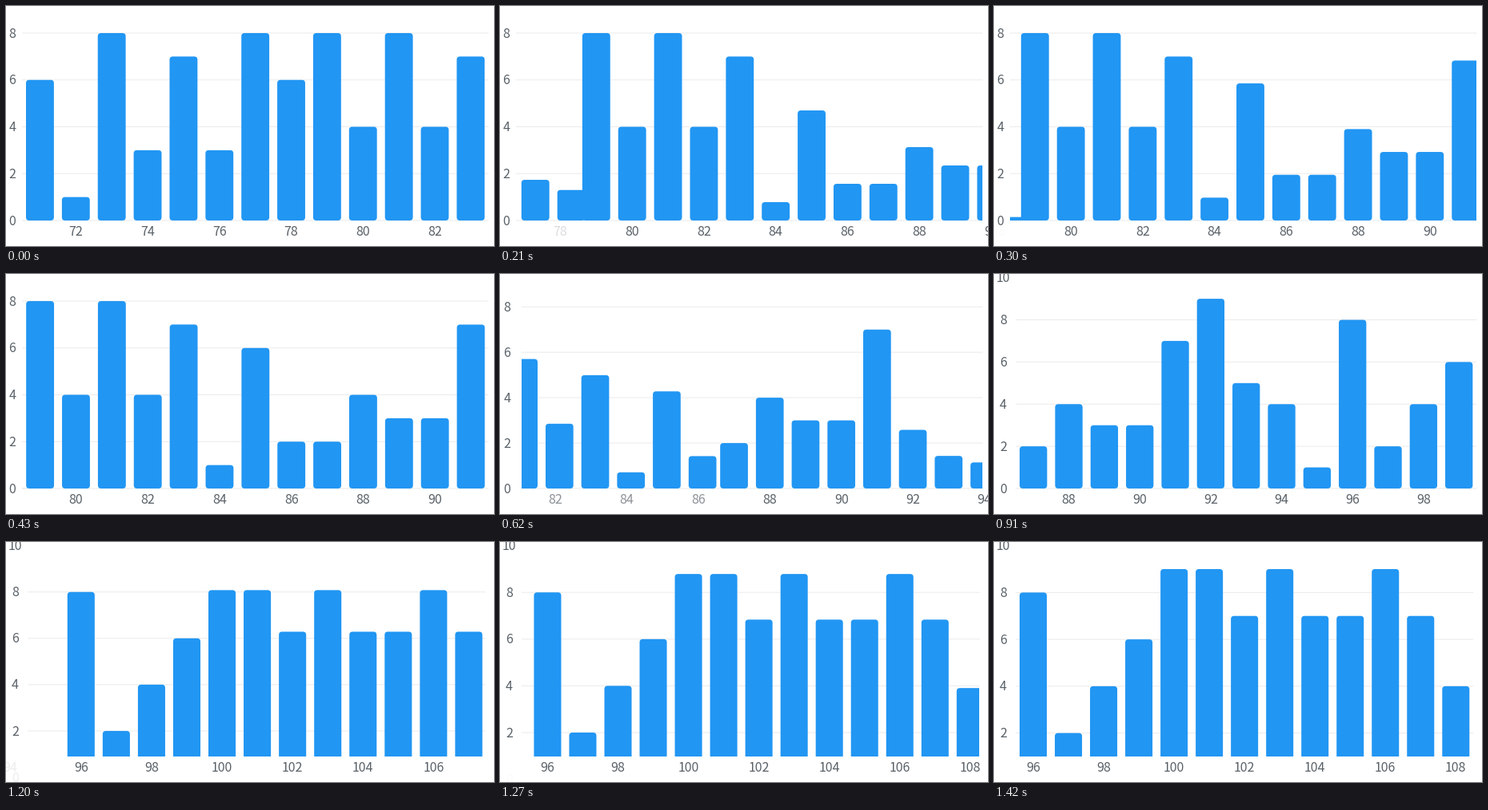
Animation, 610 px wide and 301 px high, one loop 1650 ms. Source, as a matplotlib script:

```python
import matplotlib.pyplot as plt
from matplotlib.animation import FuncAnimation
from matplotlib.patches import FancyBboxPatch, Rectangle

W, H, DPI = 610, 301, 64
PX = 72 / DPI
LOOP, TICK, REFRESH = 1650, 10, 30
EASE_MS = 291
BLUE, GRID, INK = "#2196f3", "#ebebeb", "#596168"
TOP, BOTTOM, CLIP_TOP = 4.6, 269, 20
BARS, GAP, FIRST = 13, 10, 71

# bar heights from FIRST onwards
VALUES = [6, 1, 8, 3, 7, 3, 8, 6, 8, 4, 8, 4, 7, 1, 6, 2, 2, 4, 3,
          3, 7, 9, 5, 4, 1, 8, 2, 4, 6, 9, 9, 7, 9, 7, 7, 9, 7, 4]


def digits(n):
    return len(str(n))


class View:
    """A settled window of bars; its scales follow from the data it holds."""

    def __init__(self, first):
        self.first = first
        self.keys = range(first, first + BARS)
        data = [VALUES[k - FIRST] for k in self.keys]
        self.low, high = min(data) - 1, max(data) + 1
        self.marks = [m for m in range(self.low, high + 1) if m % 2 == 0]
        self.unit = (BOTTOM - TOP) / (high - self.low)

        # wider labels take room from the plot
        wide = digits(self.marks[-1])
        self.label_x = 4.7 + 3.3 * wide
        self.left = 13 + 7 * wide
        self.right = 611.3 - 4 * digits(self.keys[-1])
        self.step = (self.right - self.left) / BARS
        self.bar = self.step - GAP

    def x(self, key):
        return self.left + (key - self.first + 0.5) * self.step

    def y(self, value):
        return BOTTOM - (value - self.low) * self.unit


VIEWS = [View(first) for first in (71, 79, 87, 96)]
# first visible change of each slide, and how long it had been easing by then
SLIDES = [(180, 34), (620, 15.5), (1110, 1.5)]


def ease_out(t):
    t = min(max(t, 0), 1)
    return 1 - (2 ** (-10 * t) - 2 ** -10) / (1 - 2 ** -10)


def lerp(a, b, p):
    return a + (b - a) * p


def moment(ms):
    """Return the view left behind, the view aimed at and the progress."""
    old, new, p = VIEWS[0], VIEWS[0], 1
    for n, (begin, lead) in enumerate(SLIDES):
        if ms >= begin:
            old, new = VIEWS[n], VIEWS[n + 1]
            shown = (ms - begin) // REFRESH * REFRESH
            p = ease_out((shown + lead) / EASE_MS)
    return old, new, p


fig = plt.figure(figsize=(W / DPI, H / DPI), dpi=DPI, facecolor="white")
ax = fig.add_axes([0, 0, 1, 1])


def label(x, y, text, alpha):
    ax.text(x, y + 5.6, str(text), ha="center", va="baseline", color=INK,
            alpha=alpha, family="Noto Sans CJK JP", fontsize=16 * PX)


def draw_bar(key, old, new, p, clip):
    value = VALUES[key - FIRST]
    width = lerp(old.bar, new.bar, p)
    x0, x1 = old.x(key) - old.bar / 2, new.x(key) - new.bar / 2
    y0, y1 = old.y(value), new.y(value)
    if key not in old.keys:
        y0 = old.y(0)
    if key not in new.keys:
        x1, y1 = new.x(key), new.y(0)
    x, y = lerp(x0, x1, p), lerp(y0, y1, p)
    height = lerp(old.y(0), new.y(0), p) - y
    if height < 0.05 or x > W or x + width < 0:
        return
    radius = min(4, height / 2)
    bar = FancyBboxPatch((x, y), width, height, fc=BLUE, lw=0,
                         boxstyle=f"round,pad=0,rounding_size={radius}")
    ax.add_patch(bar)
    bar.set_clip_path(clip)


def draw_scale(old, new, p):
    for mark in sorted({*old.marks, *new.marks}):
        alpha = 1 if mark in new.marks else 1 - p
        if alpha <= 0:
            continue
        y = lerp(old.y(mark), new.y(mark), p)
        if CLIP_TOP < y < BOTTOM + 0.5:
            ax.plot([new.left, new.right], [y, y], color=GRID, lw=PX,
                    alpha=alpha, snap=False, solid_capstyle="butt", zorder=0)
        label(lerp(old.label_x, new.label_x, p), y, mark, alpha)


def draw(i):
    old, new, p = moment(i * TICK)
    ax.clear()
    ax.set(xlim=(0, W), ylim=(H, 0))
    ax.axis("off")
    clip = Rectangle((new.left, CLIP_TOP), new.right - new.left,
                     BOTTOM - CLIP_TOP, transform=ax.transData)

    draw_scale(old, new, p)
    for key in sorted({*old.keys, *new.keys}):
        alpha = 1 if key in new.keys else 1 - p
        if alpha <= 0:
            continue
        draw_bar(key, old, new, p, clip)
        x = lerp(old.x(key), new.x(key), p)
        if key % 2 == 0 and -20 < x < W + 20:
            label(x, 282.5, key, alpha)
    return []


anim = FuncAnimation(fig, draw, frames=LOOP // TICK, interval=TICK,
                     init_func=lambda: [], repeat=True, repeat_delay=0)
plt.show()
```
